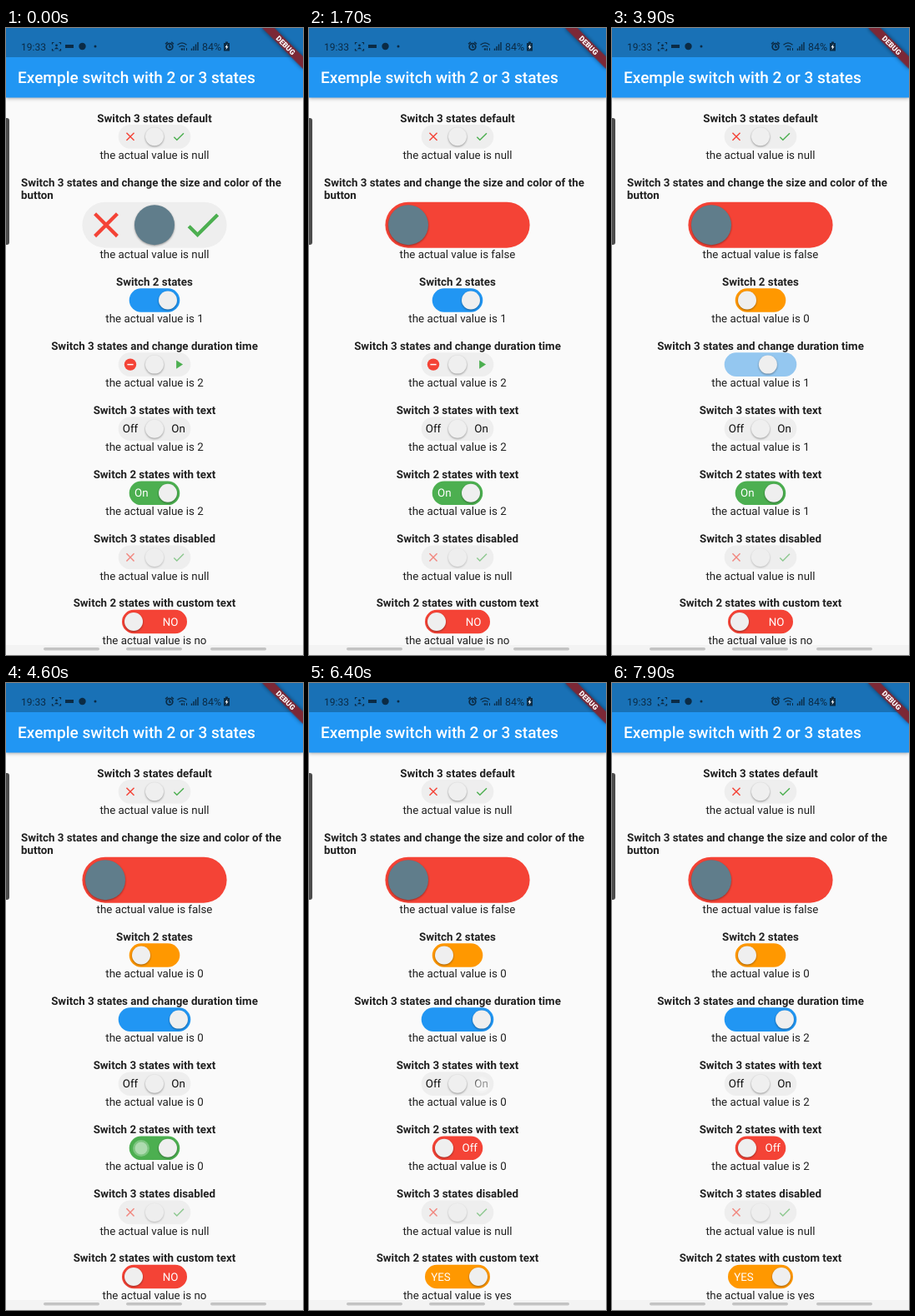
An HTML page that plays this animation: 356 by 752 pixels, repeating every 8 s.

```html
<!DOCTYPE html>
<html lang="en">
<head>
<meta charset="utf-8">
<title>Switch demo</title>
<style>
html, body { margin: 0; width: 100%; height: 100%; overflow: hidden; background: #fafafa; }
svg { display: block; width: 356px; height: 752px; font-family: Roboto, sans-serif; }
text { font-size: 13.33px; fill: #212121; text-rendering: geometricPrecision; }
.mid { text-anchor: middle; }
.bold { font-weight: 700; }
.title { font-size: 19.05px; font-weight: 500; fill: #fff; }
.status { font-size: 12.4px; fill: #0b2b45; }
.debug { font-size: 8.8px; font-weight: 900; fill: #fff; }
.white { fill: #fff; }
.black { fill: #111; }
.knob { filter: drop-shadow(0 1px 1.2px rgba(0, 0, 0, .38)); }
.bar { filter: drop-shadow(0 1.5px 2px rgba(0, 0, 0, .32)); }
.ribbon { filter: drop-shadow(0 0 2.5px rgba(0, 0, 0, .5)); }
.line { fill: none; stroke: #0b2b45; stroke-width: 1.2; }
.solid { fill: #0b2b45; }
</style>
</head>
<body>
<svg viewBox="0 0 356 752">
  <rect width="356" height="752" fill="#fafafa"/>
  <g id="rows"></g>
  <g id="touches"></g>

  <rect class="bar" width="356" height="83.5" fill="#2196f3"/>
  <rect width="356" height="35" fill="#1971b6"/>
  <text class="title" x="14" y="66">Exemple switch with 2 or 3 states</text>

  <text class="status" x="18" y="27" style="font-size:12px">19:33</text>
  <path class="line" d="M55.5 19.500v-2h2M63.500 17.500h2v2M65.500 25v2h-2M57.500 27h-2v-2"/>
  <g id="rec" class="solid"><circle cx="60.500" cy="20.800" r="1.400"/><path d="M58 25.200q2.500-4 5 0z"/></g>
  <rect class="solid" x="71" y="20" width="10" height="4"/>
  <circle class="solid" cx="91.500" cy="22" r="4.200"/>
  <circle class="solid" cx="107" cy="22" r="1.500"/>
  <g class="line">
    <circle cx="196" cy="22.500" r="3.800" stroke-width="1.800"/>
    <path d="M196 20v3h2M191 19.300l2.800-2.500M201 19.300l-2.800-2.500" stroke-width="1.500"/>
    <path d="M205.500 20.300q5.500-5 11 0M207.500 22.800q3.500-3 7 0"/>
    <path d="M213.500 27v-3M216.500 27v-3" stroke-width="1"/>
    <path d="M222.500 27v-2.500M225 27v-5M227.500 27v-7.500M230 27v-10" stroke-width="1.400"/>
  </g>
  <circle class="solid" cx="211" cy="25.500" r="1.300"/>
  <text class="status" x="235" y="27">84%</text>
  <path class="solid" d="M261 18h2v-1.500h3V18h2v9.500h-7z"/>
  <path class="white" d="M265.500 19.200l-3 4h1.800l-.8 3 3-4h-1.800z"/>

  <g transform="translate(356 0) rotate(45)">
    <rect class="ribbon" x="-34.600" y="24.200" width="69.300" height="10.400" fill="#7c2836"/>
    <text class="debug mid" y="32.600">DEBUG</text>
  </g>

  <path d="M0 108h1q3 0 3 3v146q0 3-3 3H0z" fill="#4c4c4c"/>
  <rect y="740" width="356" height="12" fill="#f3f3f3"/>
  <g fill="#c3c3c3">
    <rect x="45" y="743" width="67" height="3.500" rx="1.700"/>
    <rect x="144" y="743" width="67" height="3.500" rx="1.700"/>
    <rect x="245" y="743" width="67" height="3.500" rx="1.700"/>
  </g>
</svg>
<script>
const LOOP = 8000, CX = 178;
const TOP = 108.2, LINE = 15.6, GAP = 17.3;
const GREY = '#eeeeee', RED = '#f44336', GREEN = '#4caf50', BLUE = '#2196f3', ORANGE = '#ff9800';
const byId = id => document.getElementById(id);

// Icons on a 24 unit grid
const ICONS = {
  cross: `<path d="M5.7 5.7L18.3 18.3M18.3 5.7L5.7 18.3" fill="none" stroke="${RED}" stroke-width="2"/>`,
  check: `<path d="M9 16.17L4.83 12l-1.42 1.41L9 19 21 7l-1.41-1.41z" fill="${GREEN}"/>`,
  minus: `<circle cx="12" cy="12" r="10" fill="${RED}"/><path d="M7 11h10v2H7z" fill="#fff"/>`,
  play: `<path d="M8 5v14l11-7z" fill="${GREEN}"/>`
};
const icon = (name, x, y, s) => `<g transform="translate(${x} ${y}) scale(${s}) translate(-12 -12)">${ICONS[name]}</g>`;
const word = (str, x, y, cls) => `<text class="mid ${cls}" x="${x}" y="${y + 4.5}">${str}</text>`;
const pair = (a, b, s, dx) => y => icon(a, CX - dx, y, s) + icon(b, CX + dx, y, s);
const crossCheck = pair('cross', 'check', .72, 29);

// Steps are [time, value]; the first one holds from the start of the loop.
const shared = [[0, 2], [3680, 1], [4600, 0], [6450, 1], [7090, 0], [7640, 2]];
const fixed = [[0, 'null']];

// side: -1 left, 0 middle, 1 right. moves: [start, duration, side]
const rows = [
  { label: ['Switch 3 states default'], w: 86.6, reach: 29,
    side: 0, moves: [], colors: { 0: GREY }, deco: { 0: crossCheck }, value: fixed },
  { label: ['Switch 3 states and change the size and color of the', 'button'],
    w: 173.2, h: 55, r: 24, reach: 59, knob: '#607d8b', side: 0,
    moves: [[400, 300, 1], [1130, 200, -1]], colors: { '-1': RED, 0: GREY, 1: GREEN },
    deco: { 0: pair('cross', 'check', 2.13, 58) }, value: [[0, 'null'], [400, 'true'], [1130, 'false']] },
  { label: ['Switch 2 states'], w: 60.6, reach: 16, tint: .3,
    side: 1, moves: [[2440, 240, -1]], colors: { '-1': ORANGE, 1: BLUE }, deco: {},
    value: [[0, 1], [2440, 0]] },
  { label: ['Switch 3 states and change duration time'], w: 86.6, reach: 29, tint: .7,
    side: 0, moves: [[3680, 600, 1]], colors: { 0: GREY, 1: BLUE },
    deco: { 0: pair('minus', 'play', .72, 29) }, value: shared },
  { label: ['Switch 3 states with text'], w: 86.6, reach: 29,
    side: 0, moves: [[6450, 250, 1], [7110, 220, -1], [7640, 240, 0]],
    colors: { '-1': RED, 0: GREY, 1: BLUE },
    deco: { 0: y => word('Off', 149, y, 'black') + word('On', 206.5, y, 'black') }, value: shared },
  { label: ['Switch 2 states with text'], w: 60.6, reach: 16,
    side: 1, moves: [[4600, 250, -1]], colors: { '-1': RED, 1: GREEN },
    deco: { '-1': y => word('Off', 192.7, y, 'white'), 1: y => word('On', 162.3, y, 'white') }, value: shared },
  { label: ['Switch 3 states disabled'], w: 86.6, reach: 29, dim: .6,
    side: 0, moves: [], colors: { 0: GREY }, deco: { 0: crossCheck }, value: fixed },
  { label: ['Switch 2 states with custom text'], w: 78, reach: 25, tint: 3.3,
    side: -1, moves: [[5380, 178, 1]], colors: { '-1': RED, 1: ORANGE },
    deco: { '-1': y => word('NO', 197, y, 'white'), 1: y => word('YES', 158, y, 'white') },
    value: [[0, 'no'], [5380, 'yes']] }
];

// Finger marks: [x, y, press, release]
const touches = [
  [237, 238, 150, 400], [130, 240, 960, 1150], [162, 327, 2250, 2440], [207, 404, 3500, 3680],
  [162, 558, 4400, 4600], [207, 710, 5260, 5400], [207, 482, 6250, 6450],
  [155, 484, 7000, 7130], [178, 482, 7460, 7640]
];

// Lays out one row from its first text line and returns where the next row starts.
function build(top, row) {
  const { label, w, h = 28.6, r = 11, knob = '#efefef', dim = 1 } = row;
  const wrapped = label.length > 1;
  const heads = label.map((s, i) => wrapped
    ? `<text class="bold" x="18" y="${top + 4.5 + i * LINE}">${s}</text>`
    : word(s, CX, top, 'bold')).join('');
  const y = top + (label.length - .5) * LINE + h / 2;
  const valueY = y + (h + LINE) / 2;
  const decos = Object.keys(row.deco).map(k =>
    `<g data-side="${k}" opacity="${dim}">${row.deco[k](y)}</g>`).join('');
  const g = document.createElementNS('http://www.w3.org/2000/svg', 'g');
  g.innerHTML = `${heads}<rect class="track" x="${CX - w / 2}" y="${y - h / 2}" width="${w}" height="${h}" rx="${h / 2}"/>
    ${decos}<circle class="knob" cy="${y}" r="${r}" fill="${knob}" opacity="${dim}"/>
    ${word('', CX, valueY, 'value')}`;
  byId('rows').append(g);
  row.track = g.querySelector('.track');
  row.dot = g.querySelector('.knob');
  row.text = g.querySelector('.value');
  row.faces = [...g.querySelectorAll('[data-side]')];
  return valueY + LINE + GAP;
}

const clamp = v => Math.min(1, Math.max(0, v));
const smooth = u => u * u * (3 - 2 * u);
const lerp = (a, b, p) => a + (b - a) * p;
const rgb = hex => [1, 3, 5].map(i => parseInt(hex.slice(i, i + 2), 16));
const mix = (a, b, p) => {
  const to = rgb(b);
  return `rgb(${rgb(a).map((v, i) => Math.round(lerp(v, to[i], p)))})`;
};
const stepAt = (steps, t) => steps.filter(s => s[0] <= t).pop()[1];

function drawRow(row, t) {
  let from = row.side, to = row.side, p = 1;
  for (const [start, span, side] of row.moves) {
    if (t < start) break;
    from = to;
    to = side;
    p = smooth(clamp((t - start) / span));
  }
  row.dot.setAttribute('cx', CX + row.reach * lerp(from, to, p));
  row.track.setAttribute('fill', mix(row.colors[from], row.colors[to], p ** (row.tint || 1)));
  for (const f of row.faces) f.style.display = +f.dataset.side === to ? '' : 'none';
  const line = 'the actual value is ' + stepAt(row.value, t);
  if (row.text.textContent !== line) row.text.textContent = line;
}

rows.reduce(build, TOP);
byId('touches').innerHTML = touches.map(([x, y]) =>
  `<g fill="#fff"><circle cx="${x}" cy="${y}" r="10" opacity=".28"/><circle cx="${x}" cy="${y}" r="7.5" opacity=".38"/></g>`).join('');
const marks = [...byId('touches').children];

const begin = performance.now();
function frame() {
  const t = (performance.now() - begin) % LOOP;
  rows.forEach(row => drawRow(row, t));
  touches.forEach(([, , on, off], i) => {
    marks[i].setAttribute('opacity', clamp((t - on) / 150) * clamp(1 - (t - off) / 150));
  });
  const hidden = (t >= 2500 && t < 3200) || (t >= 5300 && t < 6000);
  byId('rec').style.display = hidden ? 'none' : '';
  requestAnimationFrame(frame);
}
frame();
</script>
</body>
</html>
```
